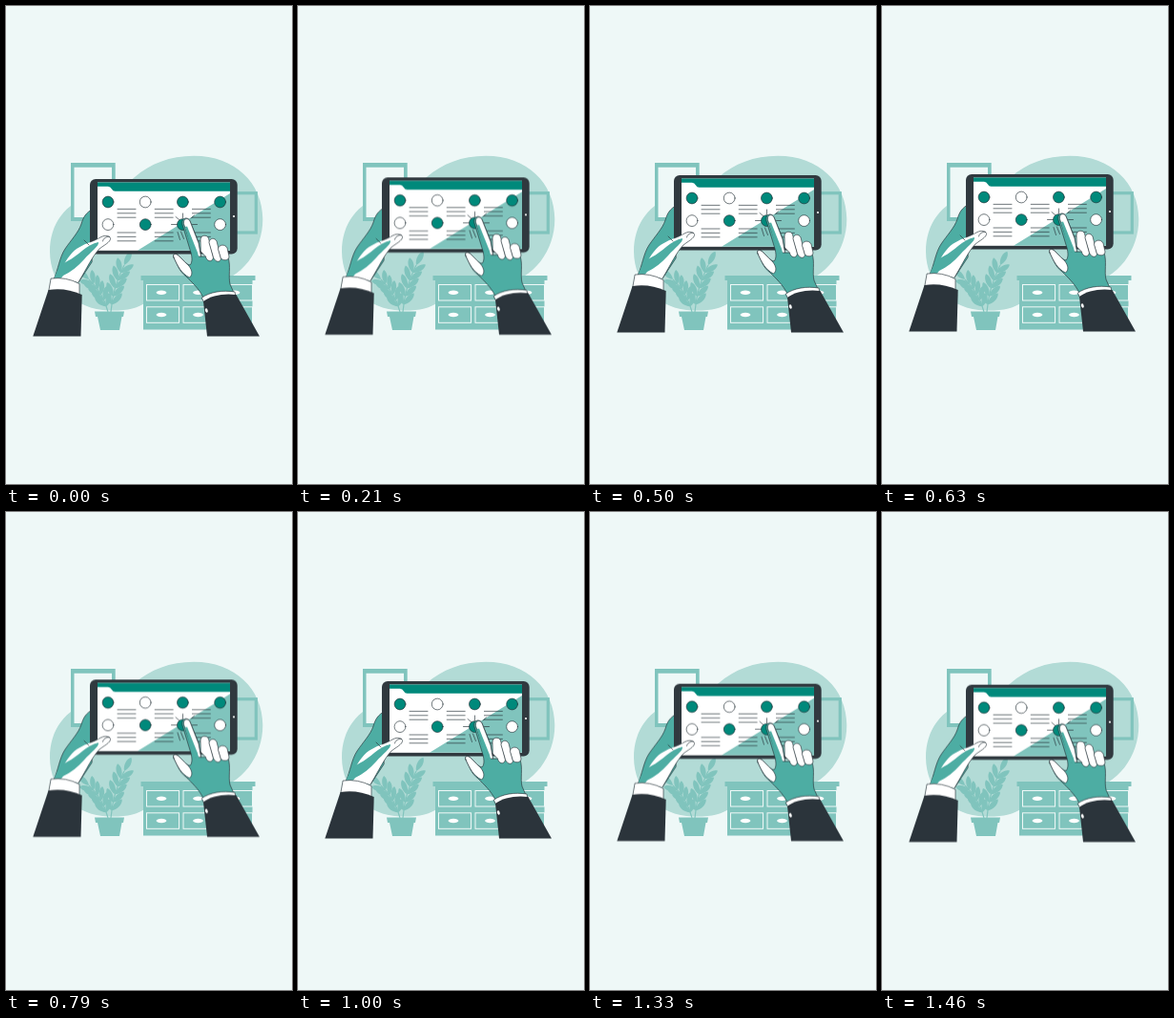
Recreate the animation shown at these times as an HTML page. Size 300 by 500 pixels, loop 1500 ms.

```html
<!DOCTYPE html>
<html lang="en">
<head>
<meta charset="utf-8">
<title>Tablet</title>
<style>
  html, body { margin: 0; width: 100%; height: 100%; overflow: hidden; background: #eef8f7; }
  svg { display: block; width: 100vw; height: 100vh; }
  .deep { fill: #00897b; }
  .skin { fill: #4dada3; }
  .mid { fill: #80c4bd; }
  .pale { fill: #b2dbd6; }
  .dark { fill: #2b343b; }
  .white { fill: #fff; }
  .ink { stroke: #263238; stroke-width: .65; stroke-linecap: round; stroke-linejoin: round; }
  .line { fill: none; }
</style>
</head>
<body>
<svg viewBox="0 0 300 500">
  <path class="pale" d="M46 257C46 228 62 206 90 198C116 191 122 190 135 179C151 165 172 156.700 197 156.700C240 156.700 269.300 185 269.300 223C269.300 255 248 286 214 291C180 296 160 300 148 309C138 317 125 319 108 318.500C72 318 46 290 46 257Z"/>

  <path class="mid" d="M68 164H114.700V225H68Z"/>
  <path fill="#eef8f7" d="M71.500 168.700H111V221H71.500Z"/>
  <rect x="215" y="195.700" width="47.300" height="41.300" fill="none" stroke="#80c4bd" stroke-width="3.200"/>

  <g id="plant" class="mid">
    <path d="M93 319.500H124L123 325H94ZM96 325H121.500L119 339H99Z"/>
  </g>

  <g id="dresser">
    <path class="mid" d="M141.500 282H261.500V287H141.500ZM144 287H258.500V338.500H144Z"/>
  </g>

  <g id="float">
    <!-- left hand behind the device -->
    <path class="skin ink" d="M90 213C84 216 81 221 79 228C76 237 68 245 62 254C56 263 55 275 50 286L76 289L90 268Z"/>

    <rect x="88" y="181" width="154.700" height="78.500" rx="6" fill="#30393f"/>
    <rect class="white" x="96" y="184.500" width="139" height="71.300"/>
    <path class="mid" d="M235 196V255.800H138Z"/>
    <path class="deep" d="M96 184.500H235V193.700H114.500Q112 193.700 111 191.500Q109.500 188.800 107 188.800H96Z"/>
    <circle class="white" cx="239" cy="220" r="1.100"/>
    <g id="list"></g>
    <path class="ink line" d="M185.500 217V222M178 220.500L181.500 223.500M173.500 228.500H179.500M180 236.500L182.500 244.500M183.500 236L186.500 243.500M194 222L197.500 219M195.500 228.500H200.500"/>

    <!-- left thumb, cuff and sleeve -->
    <path class="white" d="M56 286C57 278 61 268 67 261C73 253 81 250 88 247C94 245 97 243 100 241.500C104 239.500 109.500 240 109.500 243.500C109.500 247 103 250 98 254C91 261 85 274 76 289Z"/>
    <path class="skin" d="M50 287C53 276 58 270 65 266.500C75 262 85 249 97 247C98 251 89 257 82 265C76 272 68 278 60 282L56 287Z"/>
    <path class="ink line" d="M88 247C94 245 97 243 100 241.500C104 239.500 109.500 240 109.500 243.500C109.500 247 103 250 98 254C91 261 85 274 76 289M101.500 246C102 243 105 241 108.500 241.500M82 245L87 250"/>
    <path class="white ink" d="M47.500 285Q63 283 77 290.500L77 304L45 299Z"/>
    <path class="dark" d="M44.500 297Q62 294 79.700 302L78.500 345.500H28.300Z"/>

    <!-- right hand -->
    <path class="skin ink" d="M207 305C202 295 195 289 189 283C181 277 180 270 176 263C174 258.500 179 258.500 182 262C187 267 189 270 193 271C196 268 195 262 194 258L184.800 228C184 221 191 220 193 225L202 247L204 262L212 262L233 263C236 272 233 283 235 291L239 300Z"/>
    <path class="white ink" d="M186.400 227.500C185.700 222 191 221 193 225L202 248L204.500 262L199 262Z"/>
    <path class="skin" d="M187.800 231L190 230.500L201 258L202.500 264L197 262Z"/>
    <path class="white ink" d="M176 263C174 258.500 179 258.500 182 262C186 266 190 270 192 272C195.500 277 196 281 192.500 284C184 280 180 272 176 263Z"/>
    <g class="white ink">
      <path d="M204 244.500C204 239 211 239 212.500 243L217.500 263C216.500 269 210 267 209.500 262L204.500 257Z"/>
      <path d="M213 247C213.500 242.500 219 242 221 246L225.500 264C225 269 219 268 217.500 263Z"/>
      <path d="M222.500 254C223 249 230 249 232 253L234 262C234 267 227 266.500 225.500 264Z"/>
    </g>
    <path class="white ink" d="M205.500 305C214 299 227 297 240 299L241 304L208 310Z"/>
    <path class="dark" d="M207 309C214 303 229 300 241.500 302L266 345.500H211Z"/>
    <ellipse class="white" cx="210.300" cy="318.500" rx="1.400" ry="2.200" transform="rotate(-15 210.300 318.500)"/>
  </g>
</svg>
<script>
const $ = id => document.getElementById(id);

function add(parent, tag, attrs) {
  const el = document.createElementNS('http://www.w3.org/2000/svg', tag);
  for (const k in attrs) el.setAttribute(k, attrs[k]);
  parent.appendChild(el);
}

// Leaves in pairs along a quadratic stem, one more at its tip
function branch([x0, y0], [x1, y1], [x2, y2], pairs, size) {
  const plant = $('plant'), w = size * .24;
  add(plant, 'path', { d: `M${x0} ${y0}Q${x1} ${y1} ${x2} ${y2}`, fill: 'none', stroke: '#80c4bd', 'stroke-width': 1.2 });
  for (let i = 0; i <= pairs; i++) {
    const t = .15 + .85 * i / pairs, u = 1 - t;
    const x = u * u * x0 + 2 * u * t * x1 + t * t * x2;
    const y = u * u * y0 + 2 * u * t * y1 + t * t * y2;
    const dir = Math.atan2(u * (y1 - y0) + t * (y2 - y1), u * (x1 - x0) + t * (x2 - x1)) * 180 / Math.PI;
    for (const turn of i < pairs ? [-35, 35] : [0]) {
      add(plant, 'path', {
        d: `M0 0C${size * .3} ${-w} ${size * .8} ${-w} ${size} 0C${size * .8} ${w} ${size * .3} ${w} 0 0Z`,
        transform: `translate(${x} ${y}) rotate(${dir + turn})`
      });
    }
  }
}
branch([110, 320], [112, 294], [124, 271], 5, 16);
branch([107, 320], [102, 300], [87, 286], 5, 15);

for (const y of [291.5, 314.8]) {
  for (const x of [147.5, 186, 224.5]) {
    add($('dresser'), 'rect', { x, y, width: 34, height: 16.5, fill: 'none', stroke: '#eef8f7', 'stroke-width': 1 });
    add($('dresser'), 'ellipse', { cx: x + 15.5, cy: y + 8.2, rx: 5.4, ry: 2.2, class: 'white' });
  }
}

const rows = [[1, 0, 1, 1], [0, 1, 1, 0]];
rows.forEach((row, r) => row.forEach((on, c) => {
  const x = 107 + 39.2 * c;
  add($('list'), 'circle', { cx: x, cy: 205 + 23.6 * r, r: 5.9, class: 'ink ' + (on ? 'deep' : 'white') });
  if (c < 3) for (let i = 0; i < 3; i++) {
    add($('list'), 'path', { d: `M${x + 10} ${212.4 + 24.6 * r + 4.4 * i}h19`, class: 'ink' });
  }
}));

// 36 even steps per loop: up 6px and back
const at = y => ({ transform: `translateY(${y}px)`, easing: 'steps(18, end)' });
$('float').animate([at(0), at(-6), at(0)], { duration: 1500, delay: -5, iterations: Infinity });
</script>
</body>
</html>
```
